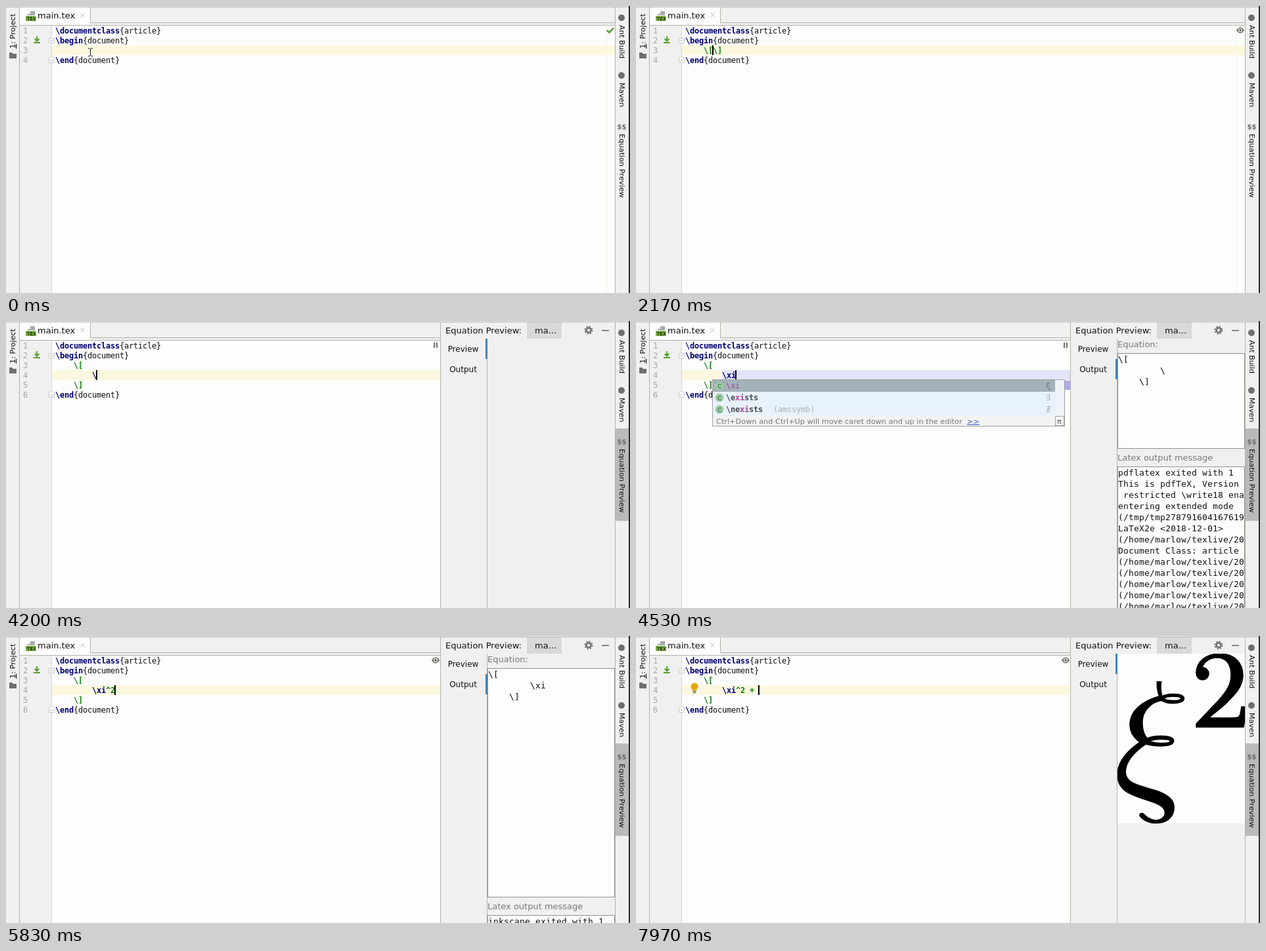
An HTML page for the animation above (8000 ms loop, 950x438 px).

```html
<!DOCTYPE html>
<html lang="en">
<head>
<meta charset="utf-8">
<title>Equation preview</title>
<style>
  html, body { margin: 0; width: 100%; height: 100%; overflow: hidden; background: #f0f0f0; }
  svg { display: block; width: 950px; height: 438px; }
  text { white-space: pre; font: 11.3px "DejaVu Sans", sans-serif; fill: #111; }
  .ui { font-size: 13px; }
  .side { font-size: 12px; text-anchor: middle; }
  .code text { font-family: "DejaVu Sans Mono", monospace; font-size: 12px; letter-spacing: -.224px; }
  .out text { font: 13px "DejaVu Sans Mono", monospace; letter-spacing: .174px; }
  .out .label { font-family: "DejaVu Sans", sans-serif; letter-spacing: 0; fill: #787874; }
  .cmd { font-weight: bold; fill: #000070; }
  .math { font-weight: bold; fill: #0b7d0b; }
  .num { fill: #a5a5a0; }
  .hit { fill: #a944a4; }
  .dim { fill: #a9b2b0; }
  .sign { fill: #75757d; }
  .bold { font-weight: bold; fill: #484c50; }
  .chrome { fill: #f0f0f0; }
  .paper { fill: #fdfdfd; }
  .box { fill: #fdfdfd; stroke: #90908c; }
  .fold { fill: #fdfdfd; stroke: #c8c8c0; }
  .icon { fill: #6e6e6c; }
  .rule { stroke: #b2b2aa; fill: none; }
  .hidden { display: none; }
</style>
</head>
<body>
<svg viewBox="0 0 950 438">
  <defs>
    <g id="xi" stroke="#000" stroke-width="3">
      <path d="M848 27H860C857 42 858 52 862 68L858 77C851 64 847 45 848 27Z"/>
      <path d="M858 68C800 84 769 115 769 152C769 174 781 193 804 207L822 194C809 183 805 165 805 145C805 112 832 83 868 81Z"/>
      <path fill-rule="evenodd" d="M853 75C862 66 880 63 895 63C914 63 926 68 926 76C926 85 912 90 894 90C878 90 866 87 859 80ZM867 76C872 80 882 82 894 82C908 82 917 80 917 76C917 72 908 70 894 70C882 70 872 72 867 76Z"/>
      <path fill-rule="evenodd" d="M808 198C822 188 840 185 857 185C882 185 896 190 896 199C896 209 880 214 857 214C838 214 820 212 806 204ZM827 200C835 204 845 206 858 206C876 206 886 204 886 200C886 196 876 194 858 194C845 194 835 196 827 200Z"/>
      <path d="M804 199C760 228 733 260 733 298C733 344 772 356 812 369C851 381 869 389 871 406C871 424 855 431 843 430C827 428 817 421 809 412C803 407 796 411 798 417C807 429 825 438 848 438C872 438 897 424 897 392C897 370 880 355 842 343C800 329 757 325 756 290C756 264 777 233 819 206Z"/>
    </g>
    <clipPath id="pane"><path d="M733 27H927V438H733Z"/></clipPath>
    <g id="bulb"><path fill="#e6a50e" d="M-5.500-2A5.500 5.500 0 0 1 5.500-2C5.500 1 3 2 3 4H-3C-3 2-5.500 1-5.500-2Z"/><path stroke="#77704a" stroke-width="1.500" d="M-3 5.500H3M-2 7.500H2"/></g>
  </defs>

  <rect class="chrome" width="950" height="438"/>
  <rect class="paper" x="70" y="30" width="857" height="408"/>
  <path stroke="#d8d8d0" d="M69.500 30V438"/>
  <path stroke="#f0f0e8" d="M914.500 30V438"/>
  <rect class="paper" x="21" y="2" width="107" height="27"/>
  <path class="rule" d="M0 1.500H948M20.500 2V438M927.500 2V438M128.500 2V25.500H927M21 29.500H927"/>

  <text class="ui" x="48" y="19">main.tex</text>
  <path stroke="#c2c2bc" d="M113 10.500l7 7m0-7l-7 7"/>
  <path fill="#a5a9ab" d="M37 8H44V14H33V12H37Z"/>
  <rect x="30" y="15" width="15" height="8" fill="#7db04a"/>
  <text x="31.500" y="22" style="font-size:7px;font-weight:bold;fill:#26390e">TEX</text>

  <text transform="translate(14 65) rotate(-90)"><tspan text-decoration="underline">1</tspan>: Project</text>
  <path class="icon" d="M5 71H9L11 73H16V80H5Z"/>

  <!-- line highlight, editor text and caret are filled in by the script -->
  <rect id="row" x="70" width="857" height="15" fill="#fcf8df"/>
  <path id="popRow" class="hidden" fill="#e3e3fa" d="M131 75H661V90H131Z"/>
  <path stroke="#58a030" stroke-width="2" fill="none" d="M47 46V53M43.500 50L47 53.500L50.500 50M42 56H52"/>
  <g id="code" class="code"></g>
  <path class="fold" d="M65.500 49.500H73.500V56.500H65.500Z"/>
  <path stroke="#a5a5a0" d="M67.500 53H71.500"/>
  <g id="fold"><path class="fold" d="M65.500-3.500L69.500-6.500L73.500-3.500V3.500H65.500Z"/><path stroke="#a5a5a0" d="M67.500 0H71.500"/></g>
  <use id="hint" href="#bulb" x="89"/>
  <rect id="caret" width="2" height="15" fill="#000"/>

  <g id="panel">
    <rect class="chrome" x="661" y="2" width="266" height="436"/>
    <rect x="928" y="164" width="20" height="141" fill="#bababa"/>
    <path class="rule" d="M661.500 2V438"/>
    <rect x="793" y="2" width="53" height="25" fill="#d9d9d9"/>
    <text class="ui" x="669" y="19">Equation Preview:</text>
    <text class="ui" x="805" y="19">ma...</text>
    <circle cx="887" cy="14" r="3.500" fill="none" stroke="#6e6e6c" stroke-width="2.500"/>
    <circle cx="887" cy="14" r="5.500" fill="none" stroke="#6e6e6c" stroke-width="2" stroke-dasharray="2.160"/>
    <path stroke="#5c5c5a" stroke-width="1.500" d="M907 14.500H918"/>
    <text class="side" x="696" y="47">Preview</text>
    <text class="side" x="696" y="78">Output</text>
    <path class="rule" d="M732.500 27V438"/>
    <rect id="tabMark" x="730" width="3" height="31" fill="#3f86b8"/>

    <g id="output" class="out" clip-path="url(#pane)">
      <text class="label" x="733" y="40">Equation:</text>
      <rect id="eqBox" class="box" x="733.500" y="49.500" width="193"/>
      <text x="734" y="63">\[</text>
      <text id="eqText" x="798" y="80"></text>
      <text x="766" y="97">\]</text>
      <g id="log"></g>
    </g>

    <g id="image" clip-path="url(#pane)">
      <rect id="imageBg" class="paper" x="733" y="27" width="194"/>
      <use id="glyph" href="#xi"/>
      <g id="two" stroke="#000" stroke-width="1.500">
        <circle cx="862.500" cy="57.500" r="9.500"/>
        <path d="M853 56C853 39 868 27 889 27C912 27 924 42 924 60C924 80 907 94 895 106L872 125H903C917 125 919 124 920 119L922 108H930L925 139H853V134L888 97C901 82 906 73 906 59C906 43 898 33 885 33C874 33 865 39 862 48Z"/>
      </g>
    </g>
  </g>

  <circle class="icon" cx="937" cy="18" r="5"/>
  <text transform="translate(933.500 29) rotate(90)">Ant Build</text>
  <circle class="icon" cx="937" cy="106" r="5"/>
  <text transform="translate(933.500 117) rotate(90)">Maven</text>
  <text x="930.500" y="188" style="font-weight:bold;font-size:10px;fill:#6e6e6c">$$</text>
  <text transform="translate(933.500 195) rotate(90)">Equation Preview</text>
  <path stroke="#2c2e2c" stroke-width="2" d="M949 0V438"/>

  <g id="popup">
    <rect x="653" y="91" width="8" height="14" fill="#b0a8ee"/>
    <rect x="116.500" y="89.500" width="536" height="71" fill="#f2f2f2" stroke="#a3a3a0"/>
    <rect x="117" y="108" width="521" height="36" fill="#e8f2fc"/>
    <rect x="638" y="90" width="14" height="54" fill="#eef3f8"/>
    <rect x="117" y="90" width="521" height="18" fill="#a3b2ba"/>
    <g id="choices" class="code"></g>
    <text x="122" y="156.500" style="fill:#787878">Ctrl+Down and Ctrl+Up will move caret down and up in the editor</text>
    <text x="504" y="156.500" text-decoration="underline" style="fill:#3d63b5">&gt;&gt;</text>
    <rect x="638.500" y="145.500" width="13" height="14" fill="#f8f8f8" stroke="#a3a3a0"/>
    <text x="641" y="156.500" style="fill:#444">π</text>
  </g>

  <g id="status">
    <path id="check" fill="none" stroke="#4f9f31" stroke-width="2.500" d="M-5 0L-1.500 3.500L5-3.500"/>
    <g id="eye"><path fill="#6e6e62" d="M-6 0Q0-9 6 0Q0 9-6 0Z"/><circle r="3" fill="#f4f4f0"/><circle r="1.700" fill="#555"/></g>
    <path id="pause" stroke="#6e6e6c" stroke-width="2" d="M-2-4V4M2-4V4"/>
  </g>
  <path id="mouse" fill="none" stroke="#111" d="M-3-5.500H-1L.5-4L2-5.500H4M.5-4V5M-3 6.500H-1L.5 5L2 6.500H4"/>
</svg>

<script>
const LOOP = 8000, SPLIT = 2700, OPEN = 3900;
const $ = id => document.getElementById(id);
const set = (id, attrs) => { for (const k in attrs) $(id).setAttribute(k, attrs[k]); };
const show = (id, on) => $(id).classList.toggle('hidden', !on);
const text = (cls, x, y, s) => `<text class="${cls}" x="${x}" y="${y}">${s}</text>`;
const colX = col => 75 + 7 * col;
const rowY = row => 15 + 15 * row;
const at = (col, row, cls, s) => text(cls, colX(col), rowY(row) + 12, s);
const latest = (list, t) => list.filter(e => e[0] <= t).pop();

// time, typed text before the caret
const typing = [
  [-500, ''], [1870, '\\'], [2070, '\\['], [SPLIT, ''], [4050, '\\'], [4300, '\\x'], [4430, '\\xi'],
  [5300, '\\xi^'], [5500, '\\xi^2'], [6900, '\\xi^2 '], [7200, '\\xi^2 +'], [7500, '\\xi^2 + ']
];
const statuses = [[0, 'check'], [1870, 'eye'], [2400, 'check'], [SPLIT, 'eye'], [3100, 'check'],
  [4050, 'pause'], [5100, 'eye']];
// time, what the tool window shows
const views = [[0, 'empty'], [4350, 'error'], [5100, 'convert'], [6200, 'xi'], [7100, 'square']];
const home = '(/home/marlow/texlive/20';
const logs = {
  error: [222, ['pdflatex exited with 1', 'This is pdfTeX, Version', ' restricted \\write18 ena',
    'entering extended mode', '(/tmp/tmp278791604167619', 'LaTeX2e &lt;2018-12-01&gt;', home,
    'Document Class: article', home, home, home, home, home]],
  convert: [426, ['inkscape exited with 1']]
};

$('choices').innerHTML = [
  ['\\', 'xi', '', '', 'ξ'], ['\\e', 'xi', 'sts', '', '∃'], ['\\ne', 'xi', 'sts', '(amssymb)', '∄']
].map(([a, hit, b, pkg, sign], i) => {
  const y = 103 + 18 * i;
  return `<circle cx="127" cy="${y - 4}" r="6.500" fill="#9fcba4"/>` +
    text('', 123.5, y - .5, '<tspan fill="#3f7050">c</tspan>') +
    text(i ? 'bold' : 'hit', 137, y, `${a}<tspan class="hit">${hit}</tspan>${b}`) +
    text('dim', 209, y, pkg) + text(i ? 'dim' : 'sign', 624, y, sign);
}).join('');

function drawCode(typed, split) {
  const last = split ? 6 : 4;
  let s = at(0, 1, 'cmd', '\\documentclass') + at(14, 1, '', '{article}') +
    at(0, 2, 'cmd', '\\begin') + at(6, 2, '', '{document}') +
    at(0, last, 'cmd', '\\end') + at(4, last, '', '{document}');
  for (let n = 1; n <= last; n++) s += text('num', 26, rowY(n) + 12, n);
  if (split) {
    s += at(4, 3, 'math', '\\[') + at(4, 5, 'math', '\\]') +
      at(8, 4, 'cmd', typed.slice(0, 3)) + at(11, 4, 'math', typed.slice(3));
  } else {
    s += at(4, 3, 'math', typed.length > 1 ? typed + '\\]' : typed);
  }
  $('code').innerHTML = s;
  set('fold', { transform: `translate(0 ${rowY(last) + 8})` });
}

function drawView(view) {
  const log = logs[view], square = view === 'square';
  show('output', log);
  show('image', view === 'xi' || square);
  show('two', square);
  set('tabMark', { y: log ? 58 : 27 });
  set('imageBg', { height: square ? 259 : 411 });
  set('glyph', { transform: square ? 'translate(348.180 55.500) scale(.525)' : '' });
  if (!log) return;
  const [top, lines] = log;
  set('eqBox', { height: top - 77 });
  $('eqText').textContent = view === 'error' ? '\\' : '\\xi';
  $('log').innerHTML = text('label', 733, top - 9, 'Latex output message') +
    `<rect class="box" x="733.5" y="${top + .5}" width="193" height="300"/>` +
    lines.map((l, i) => text('', 734, top + 14 + 17 * i, l)).join('');
}

// the pointer leaves across the left edge
function drawMouse(t) {
  const p = Math.min(1, Math.max(0, (t - 100) / 650)), eased = p * p * (3 - 2 * p);
  show('mouse', p < 1);
  set('mouse', { transform: `translate(${Math.round(128 - 136 * eased)} ${Math.round(70 + 243 * eased)})` });
}

let drawn = '';
function frame() {
  const t = performance.now() % LOOP;
  const [since, typed] = latest(typing, t);
  const split = t >= SPLIT, open = t >= OPEN, popup = t >= 4350 && t < 5030;
  const view = latest(views, t)[1], status = latest(statuses, t)[1];
  const bulb = (t >= 3200 && t < 4050) || t >= 6100;
  const caretOn = (t - since) % 1000 < 500;
  const state = [since, view, status, open, popup, bulb, caretOn].join();
  drawMouse(t);
  if (state !== drawn) {
    drawn = state;
    const row = split ? 4 : 3, col = (split ? 8 : 4) + typed.length;
    drawCode(typed, split);
    drawView(view);
    set('row', { y: rowY(row) });
    set('caret', { x: colX(col) - 1, y: rowY(row) });
    set('hint', { y: t < 4050 ? 66 : 79 });
    set('status', { transform: `translate(${open ? 654 : 920} 37)` });
    for (const id of ['check', 'eye', 'pause']) show(id, id === status);
    show('panel', open);
    show('popup', popup);
    show('popRow', popup);
    show('hint', bulb);
    show('caret', caretOn);
  }
  requestAnimationFrame(frame);
}
frame();
</script>
</body>
</html>
```
